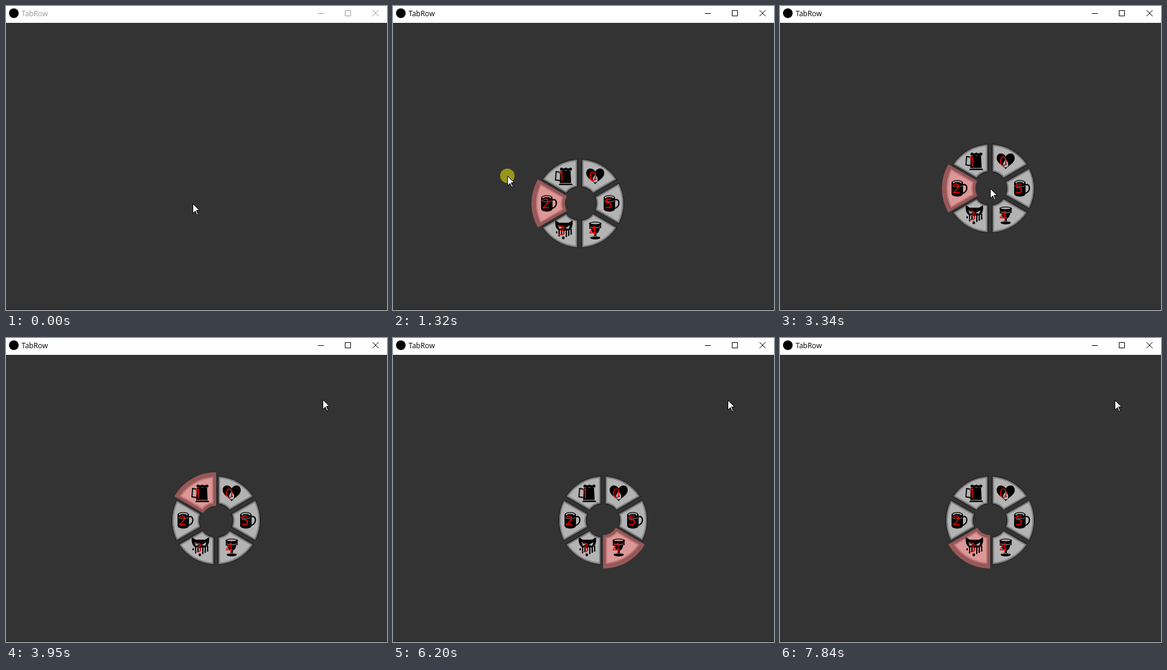
An HTML page with a canvas for the animation above (7.99 s loop, 633 px wide and 505 px high).

```html
<!DOCTYPE html>
<html lang="en">
<head>
<meta charset="utf-8">
<title>TabRow</title>
<style>
html, body { margin: 0; width: 100%; height: 100%; overflow: hidden; background: #333; }
canvas { display: block; }
</style>
</head>
<body>
<canvas id="stage" width="633" height="505"></canvas>
<script>
const ctx = document.getElementById('stage').getContext('2d');
const LOOP = 7990, STEP = 77, TAU = Math.PI * 2, HALF = TAU / 12;
const INK = '#000';

const mix = (a, b, u) => a + (b - a) * u;
const mixPoint = (p, q, u) => [mix(p[0], q[0], u), mix(p[1], q[1], u)];
const smooth = u => u * u * (3 - 2 * u);
const easeOut = u => 1 - (1 - u) ** 2;

const hub = [310, 328], low = [386, 401], side = [387, 350], open = [349, 303], rest = [556, 103];

// Leaves the hub and runs clockwise around it, faster and faster
function orbit(u) {
  const a = (477 * u ** 1.85 - 70) * TAU / 360;
  const ring = [291 + 107 * Math.cos(a), 308 + 107 * Math.sin(a)];
  return mixPoint(hub, ring, 1 - (1 - u) ** 3);
}

function swoop(u) {
  const s = smooth(u), bend = [573, 25];
  return mixPoint(mixPoint(open, bend, s), mixPoint(bend, rest, s), s);
}

const moves = [
  { at: 780, steps: 11, path: orbit },
  { at: 1630, steps: 5, path: u => mixPoint(low, side, easeOut(u)) },
  { at: 2100, steps: 4, path: u => mixPoint(side, open, u) },
  { at: 3570, steps: 11, path: swoop }
];

function pointerAt(t) {
  const move = moves.filter(m => t >= m.at).pop();
  if (!move) return hub;
  const step = Math.floor((t - move.at + 6) / STEP) + 1;
  return move.path(Math.min(1, step / move.steps)).map(Math.round);
}

// Key choices in the second wheel, -1 for none; a glide passes each neighbour on the way
const picks = [
  { at: 2560, to: -1 }, { at: 3170, to: 1 }, { at: 3340, to: 2 }, { at: 3570, to: 3 },
  { at: 3720, to: 1, glide: true }, { at: 4890, to: 3 }, { at: 5270, to: 0 }, { at: 5590, to: -1 },
  { at: 5740, to: 1 }, { at: 5890, to: 4 }, { at: 5970, to: 1 }, { at: 6200, to: 4 },
  { at: 6520, to: 1 }, { at: 6980, to: 0 }, { at: 7530, to: 3, glide: true }
];

function pickAt(t) {
  const past = picks.filter(p => t >= p.at), last = past.pop();
  if (!last.glide) return last.to;
  const from = past.pop().to, gap = last.to - from;
  const step = Math.floor((t - last.at + 6) / STEP) + 1;
  return from + Math.sign(gap) * Math.min(Math.abs(gap), step);
}

// Sector under the pointer, counted counterclockwise
function sectorAt([x, y]) {
  const dx = x - hub[0], dy = hub[1] - y;
  if (Math.hypot(dx, dy) < 23) return -1;
  return (Math.round(Math.atan2(dy, dx) / TAU * 6) + 11) % 6;
}

function fill(d, color) {
  ctx.fillStyle = color;
  ctx.fill(new Path2D(d));
}

function stroke(d, color, width) {
  ctx.strokeStyle = color;
  ctx.lineWidth = width;
  ctx.stroke(new Path2D(d));
}

function oval(x, y, rx, ry, color) {
  ctx.fillStyle = color;
  ctx.beginPath();
  ctx.ellipse(x, y, rx, ry, 0, 0, TAU);
  ctx.fill();
}

function heart(face) {
  fill('M0 13C-4 7-15 3-15-5C-15-15-4-15 0-8C4-15 15-15 15-5C15 3 4 7 0 13Z', INK);
  fill('M0-5C1 0 5 2 4 6A4 4 0 0 1-4 6C-5 2-1 0 0-5Z', face);
  fill('M0 1L2 6H-2Z', INK);
}

function stein() {
  fill('M-6-9H11L12 11H-7ZM-9 14.5L-7 12H13L15 14.5Z', INK);
  for (let i = 0; i < 5; i++) oval(-4 + i * 3.7, -12 + i % 2, 2.5, 2.5, INK);
  stroke('M-7-7L-13-8L-14 6L-7 7', INK, 1.8);
}

function cup(face) {
  fill('M-12-9V9C-11 15 6 15 7 9V-9Z', INK);
  oval(-2.5, -9.5, 9.5, 4.3, INK);
  oval(-2.5, -10, 7.5, 2.6, face);
  oval(-2.5, -9, 5.5, 1.4, INK);
  stroke('M-11-5C-8-2 3-2 6-5', face, 0.8);
  stroke('M7-6C15-9 16 5 7 8', INK, 2.2);
}

function mask(face) {
  fill('M-14-17L-8-13H8L14-17C16-9 12-1 8 0H-8C-12-1-16-9-14-17Z', INK);
  fill('M-10-9L-2-4L-8-3ZM10-9L2-4L8-3Z', face);
  for (let i = 0; i < 7; i++) {
    const x = i * 4 - 12, end = 3 + i * 5 % 7;
    ctx.fillRect(x - 1, -3, 2, end + 3);
    oval(x, end, 1.3, 2, INK);
  }
  oval(-1, 12, 2.2, 2.6, INK);
}

function goblet(face) {
  oval(0, -11.5, 10.5, 3.2, INK);
  oval(0, -12, 8, 1.4, face);
  fill('M-8-10C-8 0-5 4-2 5V11H2V5C5 4 8 0 8-10Z', INK);
  stroke('M-7-6C-4-4 4-4 7-6', face, 1);
  stroke('M-9-10V-3M9-10V-4', INK, 1.6);
  oval(0, 12, 8.5, 2.8, INK);
  stroke('M-6 11C-3 9 3 9 6 11', face, 0.8);
}

const icons = [heart, stein, cup, mask, goblet, cup];

// Ring slice around angle a, its straight sides moved in by gap
function slice(a, inner, outer, gap, color) {
  const o = HALF - Math.asin(gap / outer), i = HALF - Math.asin(gap / inner);
  ctx.beginPath();
  ctx.arc(0, 0, outer, a - o, a + o);
  ctx.arc(0, 0, inner, a + i, a - i, true);
  ctx.closePath();
  ctx.fillStyle = color;
  ctx.fill();
}

function sector(n, on) {
  const a = -(n + 1) * TAU / 6, face = on ? '#dc9898' : '#b3b3b3';
  if (on) slice(a, 24.5, 80, 0, '#985858');
  slice(a, 27.5, 74, 3, on ? '#8c5050' : '#151212');
  ctx.save();
  slice(a, 28.5, 73, 4, face);
  ctx.clip();
  ctx.strokeStyle = on ? 'rgba(120,50,50,.18)' : 'rgba(0,0,0,.16)';
  for (let w = 2; w < 8; w += 2) {
    ctx.lineWidth = w;
    ctx.stroke();
  }
  ctx.restore();
  ctx.save();
  ctx.translate(Math.round(Math.cos(a) * 52), Math.round(Math.sin(a) * 52));
  icons[n](face);
  ctx.fillStyle = '#f00';
  ctx.font = '22px "Open Sans", sans-serif';
  ctx.textAlign = 'center';
  ctx.fillText(n, -4, 8);
  ctx.restore();
}

function wheel([x, y], chosen) {
  ctx.save();
  ctx.translate(x, y);
  icons.forEach((icon, n) => sector(n, n === chosen));
  ctx.restore();
}

function titleBar(active) {
  const ink = active ? '#000' : '#999';
  ctx.fillStyle = '#fff';
  ctx.fillRect(0, 0, 633, 28);
  oval(13, 12, 8, 8, INK);
  ctx.fillStyle = ink;
  ctx.textAlign = 'left';
  ctx.font = '12px "Open Sans", sans-serif';
  ctx.fillText('TabRow', 26, 17);
  stroke('M518 12.5H528M563.5 7.5H572.5V16.5H563.5ZM609 7L619 17M619 7L609 17', ink, 1);
}

function pointer([x, y], pressed) {
  if (pressed) oval(x, y, 12, 12, 'rgba(255,250,0,.49)');
  ctx.save();
  ctx.translate(x, y);
  const arrow = 'M.5.5V16.5L4.5 12.5L7 18.5H8.5L9 17.5L6.5 11.5H11.5Z';
  fill(arrow, '#fff');
  stroke(arrow, INK, 1);
  ctx.restore();
}

function draw(t) {
  ctx.fillStyle = '#333';
  ctx.fillRect(0, 0, 633, 505);
  ctx.fillStyle = '#222';
  ctx.fillRect(0, 504, 633, 1);
  titleBar(t >= 310);

  const tip = pointerAt(t);
  if (t >= 390 && t < 1630) wheel(hub, sectorAt(tip));
  if (t >= 2560) wheel(open, pickAt(t));
  pointer(tip, (t >= 310 && t < 1630) || (t >= 2560 && t < 2710));
}

const start = performance.now();
function tick() {
  draw((performance.now() - start) % LOOP);
  requestAnimationFrame(tick);
}
tick();
</script>
</body>
</html>
```
